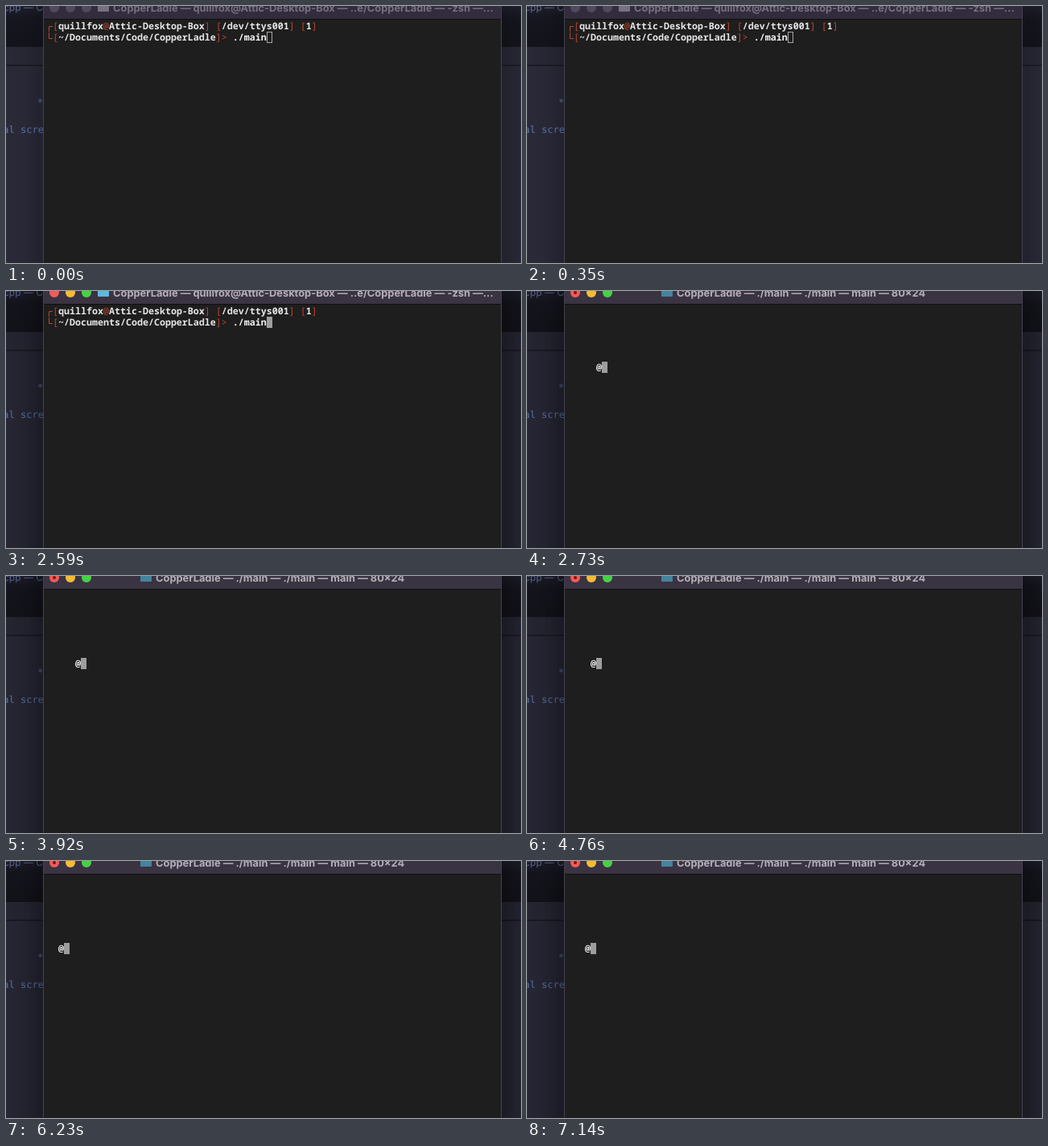
Write an HTML page that moves like this. It is 640 px wide and 320 px high and loops after 8.96 s.

```html
<!DOCTYPE html>
<html lang="en">
<head>
<meta charset="utf-8">
<title>Terminal</title>
<style>
  html, body { margin: 0; width: 100%; height: 100%; overflow: hidden; background: #1e1e1e; }
  svg { display: block; width: 640px; height: 320px; }
  text { white-space: pre; text-rendering: geometricPrecision; }

  .mono { font: 600 11.667px "Noto Sans Mono", monospace; fill: #f4f4f4; }
  .prompt { font-weight: 700; fill: #e6e6e6; }
  .mark { font-weight: 500; fill: #bd442f; }
  .typed { font-weight: 600; fill: #f4f4f4; }
  .title { font: 700 12.85px Inter, sans-serif; }
  .code { font: 12px "DejaVu Sans Mono", monospace; }
  .tab { font: 12px Inter, sans-serif; }

  .until-focus, .from-focus, .until-fill, .from-fill, .shell, .program, .walker {
    animation: 8960ms step-end infinite;
  }
  .until-focus { animation-name: until-focus; }
  .from-focus { animation-name: from-focus; }
  .until-fill { animation-name: until-fill; }
  .from-fill { animation-name: from-fill; }
  .shell { animation-name: shell; }
  .program { animation-name: program; }
  .walker { animation-name: walk; }

  @keyframes until-focus { 0% { opacity: 1 } 20.3125%, 100% { opacity: 0 } }
  @keyframes from-focus { 0% { opacity: 0 } 20.3125%, 100% { opacity: 1 } }
  @keyframes until-fill { 0% { opacity: 1 } 21.09375%, 100% { opacity: 0 } }
  @keyframes from-fill { 0% { opacity: 0 } 21.09375%, 100% { opacity: 1 } }
  @keyframes shell { 0% { opacity: 1 } 29.6875%, 100% { opacity: 0 } }
  @keyframes program { 0% { opacity: 0 } 29.6875%, 100% { opacity: 1 } }

  /* One cell is 7 by 14 px. */
  @keyframes walk {
    0% { transform: translate(86px, 88px) }
    43.75% { transform: translate(86px, 102px) }
    47.65625% { transform: translate(86px, 116px) }
    49.21875% { transform: translate(79px, 116px) }
    53.125% { transform: translate(79px, 102px) }
    56.25% { transform: translate(86px, 102px) }
    59.375% { transform: translate(86px, 116px) }
    60.15625% { transform: translate(86px, 102px) }
    63.28125% { transform: translate(79px, 102px) }
    65.625% { transform: translate(72px, 102px) }
    69.53125% { transform: translate(65px, 102px) }
    73.4375% { transform: translate(58px, 102px) }
    75.78125% { transform: translate(65px, 102px) }
    79.6875%, 100% { transform: translate(72px, 102px) }
  }
</style>
</head>
<body>
<svg viewBox="0 0 640 320">
  <defs>
    <linearGradient id="header" x2="0" y2="1">
      <stop stop-color="#20202e"/>
      <stop offset=".3" stop-color="#171721"/>
      <stop offset="1" stop-color="#14141c"/>
    </linearGradient>
    <linearGradient id="shade">
      <stop stop-color="#000" stop-opacity="0"/>
      <stop offset=".5" stop-color="#000" stop-opacity=".08"/>
      <stop offset="1" stop-color="#000" stop-opacity=".3"/>
    </linearGradient>
    <g id="shadow" fill="url(#shade)">
      <rect width="46" height="320"/>
      <rect width="46" height="320" transform="translate(662) scale(-1 1)"/>
    </g>
    <path id="folder" d="M0-4h5l2 2h7v8q0 1-1 1H1q-1 0-1-1z"/>
    <g id="lights">
      <circle cx="60" cy="2" r="6"/>
      <circle cx="80" cy="2" r="6"/>
      <circle cx="100" cy="2" r="6"/>
    </g>
  </defs>

  <!-- Editor behind the terminal -->
  <rect width="640" height="320" fill="#2a2a39"/>
  <rect width="640" height="51" fill="url(#header)"/>
  <rect y="51" width="640" height="22" fill="#292937"/>
  <rect y="73" width="640" height="2" fill="#1d1d28"/>
  <text class="tab" x="-3" y="6" fill="#5f6c96">cpp — CopperLadle</text>
  <text class="code" x="39" y="124" fill="#6570a6">*</text>
  <text class="code" x="-3.7" y="158" fill="#6079b3">al screen</text>
  <use href="#shadow" opacity=".6"/>
  <g class="from-focus">
    <rect width="640" height="320" opacity=".07"/>
    <use href="#shadow" opacity=".5"/>
  </g>

  <!-- Terminal window -->
  <rect x="46" width="570" height="320" fill="#1e1e1e"/>
  <g class="until-focus">
    <rect x="46" width="570" height="16" fill="#322c3e"/>
    <use href="#lights" fill="#51495d"/>
  </g>
  <g class="from-focus">
    <rect x="46" width="570" height="16" fill="#3a3342"/>
    <circle cx="60" cy="2" r="6" fill="#f25a57"/>
    <circle cx="80" cy="2" r="6" fill="#f6bd30"/>
    <circle cx="100" cy="2" r="6" fill="#45d343"/>
  </g>
  <rect x="46" y="16" width="570" height="1" fill="#0f0e11"/>
  <path d="M46.5 0V320M615.5 0V320" stroke="#454350"/>

  <g class="shell">
    <g class="until-focus" fill="#777080">
      <use href="#folder" x="114"/>
      <text class="title" x="133" y="6.5">CopperLadle — quillfox@Attic-Desktop-Box — ..e/CopperLadle — -zsh —...</text>
    </g>
    <g class="from-focus" fill="#b5afb9">
      <use href="#folder" x="114" fill="#5db9df"/>
      <text class="title" x="133" y="6.5">CopperLadle — quillfox@Attic-Desktop-Box — ..e/CopperLadle — -zsh —...</text>
    </g>

    <path d="M58 25.5H53.5V32M53.5 33V40.5H58" fill="none" stroke="#bd442f"/>
    <text class="mono prompt" x="58" y="29"><tspan class="mark">[</tspan>quillfox<tspan class="mark">@</tspan>Attic-Desktop-Box<tspan class="mark">] [</tspan>/dev/ttys001<tspan class="mark">] [</tspan>1<tspan class="mark">]</tspan></text>
    <text class="mono prompt" x="58" y="43"><tspan class="mark">[</tspan>~/Documents/Code/CopperLadle<tspan class="mark">]&gt;</tspan><tspan class="typed"> ./main</tspan></text>
    <rect class="until-fill" x="324.5" y="32.5" width="6" height="13" fill="none" stroke="#a8a8a8"/>
    <rect class="from-fill" x="324" y="32" width="7" height="14" fill="#9d9d9d"/>
  </g>

  <g class="program">
    <circle cx="60" cy="2" r="2" fill="#7c1413"/>
    <use href="#folder" x="167" fill="#43849f"/>
    <text class="title" x="186" y="6.5" fill="#b5afb9">CopperLadle — ./main — ./main — main — 80×24</text>
    <g class="walker">
      <text class="mono" y="11">@</text>
      <rect x="7" width="7" height="14" fill="#9d9d9d"/>
    </g>
  </g>
</svg>
</body>
</html>
```
